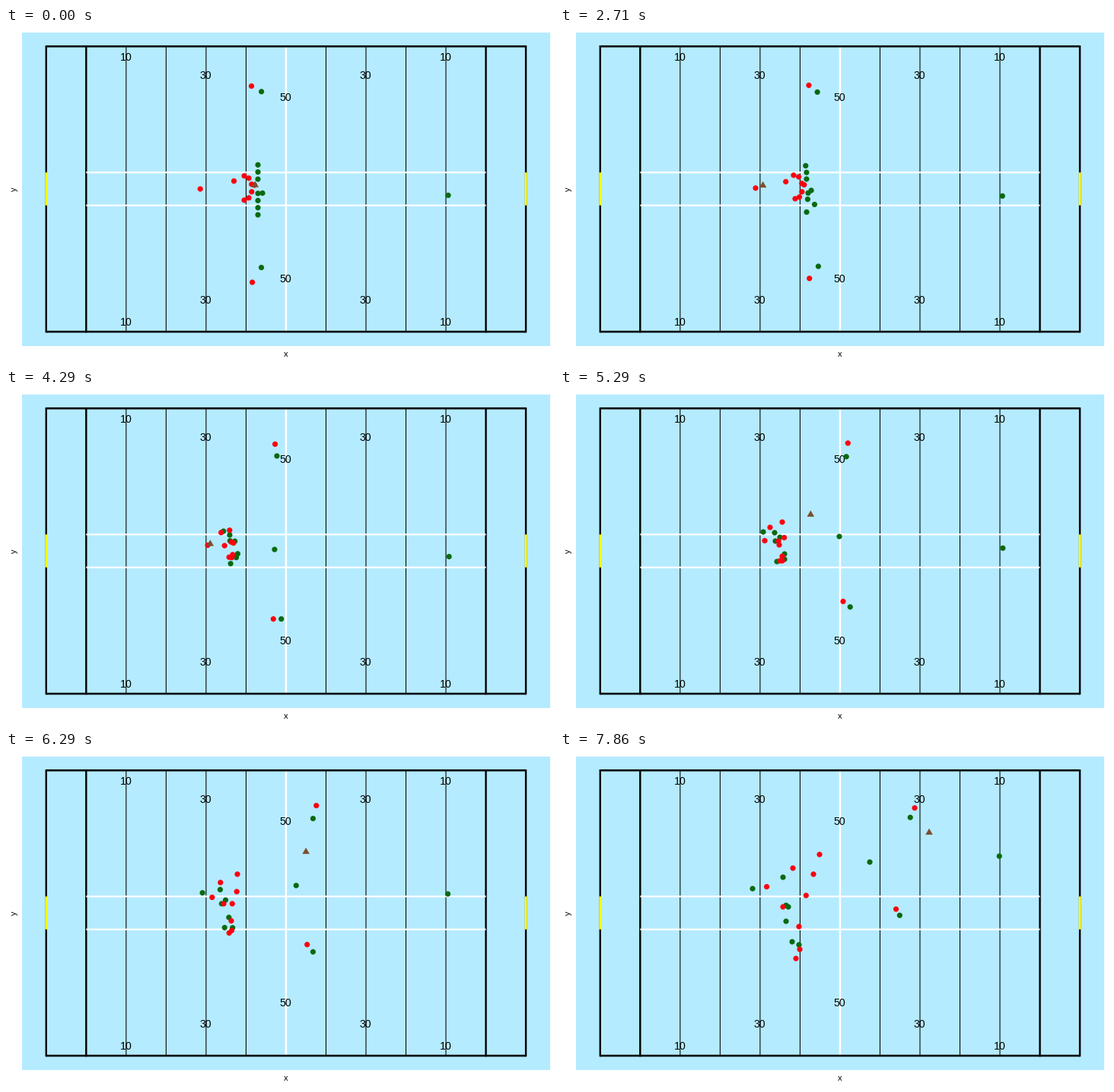
A matplotlib script that plays this animation: 720 by 440 pixels, repeating every 8 s.

```python
import numpy as np
import matplotlib.pyplot as plt
from matplotlib.animation import FuncAnimation
from matplotlib.patches import Circle, Polygon, Rectangle

W, H, DPI = 720, 440, 80
PX = 72 / DPI                      # points per pixel
LOOP, STEPS, FRAMES = 8000, 56, 200

SKY, RED, GREEN = "#b5ebff", "#fb0010", "#0a6a10"
BROWN, YELLOW = "#7b4f2e", "#fffb0a"

plt.rcParams["font.family"] = "Liberation Sans"
fig = plt.figure(figsize=(W / DPI, H / DPI), dpi=DPI, facecolor="white")
ax = fig.add_axes([0, 0, 1, 1])
ax.set_xlim(0, W)
ax.set_ylim(H, 0)
ax.axis("off")

# --- field -----------------------------------------------------------------
LEFT, YARD = 52.8, 5.252
TOP, BOTTOM = 24.2, 400.1
HASH = (190.3, 233.7)


def yard_x(yards):
    return LEFT + YARD * yards


def line(xs, ys, color, width=2.2):
    ax.plot(xs, ys, color=color, lw=width * PX, snap=False,
            solid_capstyle="butt", zorder=2)


def vline(yards, color, width=2.2, y0=TOP, y1=BOTTOM):
    line([yard_x(yards)] * 2, [y0, y1], color, width)


def label(x, y, text, size=14.2, **kw):
    ax.text(x, y, text, fontsize=size * PX, ha="center", va="center",
            color="black", zorder=3, **kw)


ax.add_patch(Rectangle((21.3, 5.5), 693.2, 413.2, color=SKY, lw=0, zorder=1))
for yards in range(20, 110, 10):
    if yards != 60:
        vline(yards, "black", 1.07)
vline(60, "white", 2.5)
for yards in (0, 10, 110, 120):
    vline(yards, "black", 2.4, TOP - 1.2, BOTTOM + 1.2)
for y in (TOP, BOTTOM):
    line([LEFT, yard_x(120)], [y, y], "black", 2.6)
for y in HASH:
    line([yard_x(10), yard_x(110)], [y, y], "white")
for yards in (0, 120):
    vline(yards, YELLOW, 2.8, *HASH)

for mark, upper, lower in ((10, 39, 387.5), (30, 63, 359), (50, 91.5, 331)):
    for yards in {10 + mark, 110 - mark}:
        for y in (upper, lower):
            label(yard_x(yards) - 0.5, y, str(mark))
label(yard_x(60), 430, "x", 11)
label(11, 212, "y", 11, rotation=90)

# --- players ---------------------------------------------------------------
SNAP, CATCH, KICK = 13, 20, 31
RUN = np.array([SNAP, 37, STEPS - 1])


def run(t, pts):
    """Smooth run through three points, starting from rest at the snap."""
    if t <= SNAP:
        return pts[0]
    slope = np.gradient(pts, RUN, axis=0, edge_order=2)
    slope[0] = 0
    i = int(t >= RUN[1])
    h = RUN[i + 1] - RUN[i]
    u = (t - RUN[i]) / h
    ease = u * u * (3 - 2 * u)
    return (pts[i] + ease * (pts[i + 1] - pts[i])
            + u * (1 - u) * h * ((1 - u) * slope[i] - u * slope[i + 1]))


players = []


def player(color, start, meet, end):
    dot = Circle(start, 3.6, color=color, lw=0, zorder=4 if color == GREEN else 5)
    ax.add_patch(dot)
    players.append((dot, np.array([start, meet, end], float)))


# kicking side: a bowed line of six, then the men placed around it
angles = np.radians(np.linspace(-90, 90, 6))
arc = zip(313 + 10.3 * np.cos(angles), 210.8 + 16 * np.sin(angles))
for start, meet, end in zip(
        arc,
        [(276, 181), (292, 174), (287, 199), (292, 219), (292, 225), (289, 225)],
        [(306, 153), (341, 135), (293, 204), (314, 230), (315, 260), (310, 272)]):
    player(RED, start, meet, end)
player(RED, (326.5, 207), (294.6, 194.5), (333, 161))       # snapper
player(RED, (299.5, 201.6), (288, 204), (323.3, 189))       # protector
player(RED, (255.2, 212), (269, 198.5), (271.6, 177.5))     # kicker
player(RED, (322.5, 76.5), (378.3, 70), (466, 73.7))        # wide runners
player(RED, (323.6, 335), (372, 278.5), (441.5, 207))

# receiving side: an evenly spaced front with a gap in the middle
front = [(331, 180.3 + 9.4 * k) for k in range(8) if k != 3]
for start, meet, end in zip(
        front,
        [(267, 187), (282, 188), (283, 199), (295, 216), (295, 223), (367, 193),
         (285, 226)],
        [(253, 180), (293, 165), (297, 202), (297, 223), (314, 254), (407, 145),
         (305, 250)]):
    player(GREEN, start, meet, end)
player(GREEN, (337, 217.5), (289, 194), (300, 204))         # backer
player(GREEN, (335.6, 83.8), (376.2, 87.8), (460.2, 86.2))  # wide blockers
player(GREEN, (335.5, 315.5), (381.2, 285.8), (446.3, 215.2))
player(GREEN, (581, 220.4), (581.8, 208.3), (577.2, 137.2))  # returner

# --- ball: snapped back, carried a little, then kicked ----------------------
SPOT, HANDS, BOOT = np.array([(327.2, 207), (256.5, 207.5), (269.5, 202.3)])
SPEED, DRAG = np.array([(10.3, -7.15), (-0.055, 0.131)])
SHAPE = 5.5 * np.array([(0, -1), (0.87, 0.5), (-0.87, 0.5)])
ball = Polygon(SHAPE, closed=True, color=BROWN, lw=0, zorder=6)
ax.add_patch(ball)


def ball_pos(t):
    if t < CATCH:
        return SPOT + max(t - SNAP, 0) / (CATCH - SNAP) * (HANDS - SPOT)
    if t < KICK:
        return HANDS + (t - CATCH) / (KICK - CATCH) * (BOOT - HANDS)
    s = t - KICK
    return BOOT + SPEED * s + DRAG * s * s


def draw(frame):
    # the positions advance seven times a second
    t = min((frame + 1) * STEPS // FRAMES, STEPS - 1)
    for dot, pts in players:
        dot.center = run(t, pts)
    ball.set_xy(SHAPE + ball_pos(t))
    return [dot for dot, _ in players] + [ball]


anim = FuncAnimation(fig, draw, frames=FRAMES, interval=LOOP // FRAMES,
                     repeat=True, repeat_delay=0, blit=False)
plt.show()
```
